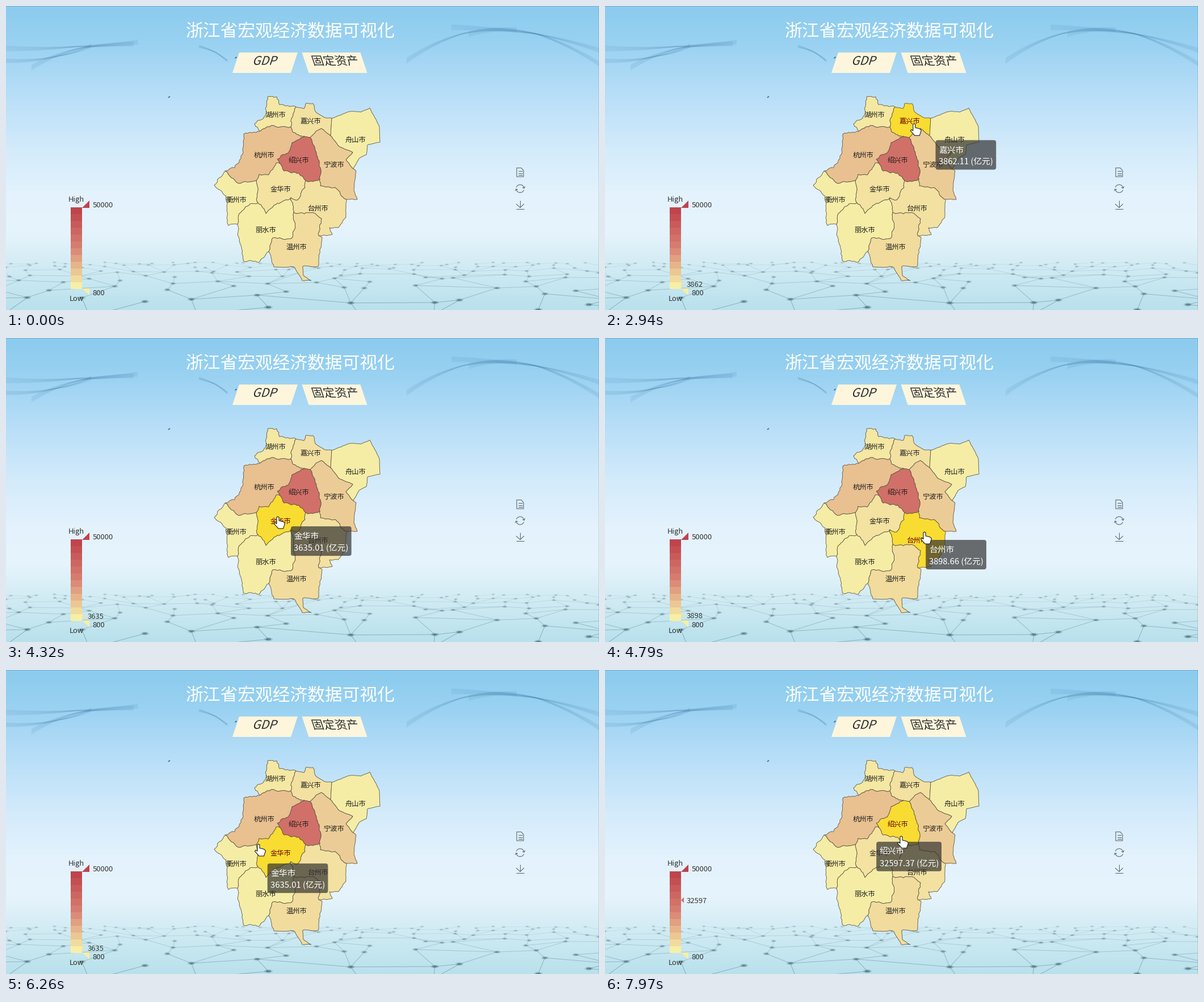
A matplotlib script that plays this animation: 1045 px wide and 536 px high, repeating every 8 s.

```python
import numpy as np
import matplotlib.pyplot as plt
from matplotlib.animation import FuncAnimation
from matplotlib.collections import EllipseCollection, LineCollection
from matplotlib.colors import to_rgb
from matplotlib.patches import FancyBboxPatch, PathPatch, Polygon, Rectangle
from matplotlib.path import Path
from matplotlib.textpath import TextPath

W, H, DPI = 1045, 536, 64
STEP, LOOP = 50, 8000

plt.rcParams["font.family"] = "Noto Sans CJK JP"
rng = np.random.default_rng(5)
fig = plt.figure(figsize=(W / DPI, H / DPI), dpi=DPI)
ax = fig.add_axes([0, 0, 1, 1])
ax.axis("off")


def px(size):
    return size * 72 / DPI


def label(x, y, s, size, color="#333333", ha="center", z=5):
    """Text whose glyphs are centred on height y."""
    return ax.text(x, y + 0.37 * size, s, fontsize=px(size), color=color,
                   ha=ha, va="baseline", zorder=z)


def poly(points, color, edge="none", lw=0, z=3):
    return ax.add_patch(Polygon(points, closed=True, fc=color, ec=edge,
                                lw=px(lw), joinstyle="round", zorder=z))


def stroke(xs, ys, color="#5f6a70", lw=1.1, z=4):
    ax.plot(xs, ys, color=color, lw=px(lw), zorder=z, solid_capstyle="butt")


# ---------- backdrop ----------
SKY = {0: "#8bcbee", 60: "#98d1f1", 160: "#b9dff8", 250: "#d3ebfb",
       330: "#e3f2fd", 400: "#e6f4fc", 445: "#d6edf5", 536: "#b8e1ec"}


def draw_sky():
    tones = np.array([to_rgb(c) for c in SKY.values()])
    rows = np.stack([np.interp(np.arange(H), list(SKY), tones[:, k])
                     for k in range(3)], axis=1)
    image = np.repeat(rows[:, None], W, axis=1)
    image[0] *= 0.86
    image[:, -1] *= 0.88
    ax.imshow((image * 255).astype(np.uint8), extent=(0, W, H, 0),
              interpolation="nearest", aspect="auto", zorder=0)


def wave(start, bend, end, count=9, spread=13):
    """Faint strands along a quadratic curve, fanning out from its middle."""
    u = np.linspace(0, 1, 40)[:, None]
    p, q, r = map(np.array, (start, bend, end))
    base = (1 - u) ** 2 * p + 2 * u * (1 - u) * q + u ** 2 * r
    fan = np.column_stack([0 * u, 1.3 * np.abs(u - 0.55) + 0.08])
    strands = [base + fan * spread * k / count for k in range(count)]
    ax.add_collection(LineCollection(strands, colors="#33709f", alpha=0.065,
                                     linewidths=px(1.4), zorder=1))


def draw_waves():
    wave((0, 70), (110, 78), (232, 60))
    wave((0, 93), (90, 99), (150, 67), spread=10)
    wave((45, 104), (110, 68), (225, 63))
    wave((340, 69), (368, 78), (390, 95), spread=6)
    wave((706, 92), (790, 36), (900, 38))
    wave((785, 33), (930, 40), (1045, 74))
    wave((815, 45), (915, 20), (1045, 98))
    for x, y in ((405, 91), (287.5, 160.5)):
        stroke([x - 1.5, x + 1.5], [y + 1, y - 1], "#3c6c95", 1.8, 1)


def draw_network():
    """Jittered grid of nodes on a receding floor, joined to their neighbours."""
    rows = []
    for k in range(8):
        depth = 19 * 1.27 ** k
        gap = 1.5 * depth
        x = np.arange(-gap, W + 2 * gap, gap)
        x = x + rng.uniform(-0.38, 0.38, len(x)) * gap
        y = 435 + depth * (1 + rng.uniform(-0.12, 0.12, len(x)))
        rows.append(np.column_stack([x, y]))
    links = []
    for row, ahead in zip(rows, rows[1:] + [None]):
        links += [pair for pair in zip(row, row[1:]) if rng.random() < 0.6]
        if ahead is not None:
            for p in row:
                near = np.argmin(np.abs(ahead[:, 0] - p[0] + rng.normal(0, 15)))
                links.append((p, ahead[near]))
    dots = np.vstack(rows)

    def tint(color, alpha):
        return [(*to_rgb(color), a) for a in alpha]

    reach = np.clip((np.array(links)[:, :, 1].mean(axis=1) - 450) / 75, 0, 1)
    ax.add_collection(LineCollection(
        links, colors=tint("#4a7684", 0.08 + 0.42 * reach),
        linewidths=px(0.9), zorder=1))
    size = np.clip((dots[:, 1] - 450) / 80, 0, 1)
    for grow, alpha in ((1.6, 0.13), (1, 0.36)):
        ax.add_collection(EllipseCollection(
            grow * (4.5 + 5 * size), grow * (2 + 2 * size), 0 * size, units="xy",
            offsets=dots, offset_transform=ax.transData, edgecolors="none",
            facecolors=tint("#375b67", alpha * (0.5 + size)), zorder=1))


# ---------- heading, buttons, tools ----------
def slanted(s, cx, cy, size, slope):
    outline = TextPath((0, 0), s, size=size)
    x, y = outline.vertices.T
    box = outline.get_extents()
    y = y - (box.y0 + box.y1) / 2
    x = x - (box.x0 + box.x1) / 2 + slope * y
    ax.add_patch(PathPatch(Path(np.column_stack([cx + x, cy - y]), outline.codes),
                           fc="#2b2b2b", ec="none", zorder=4))


def button(cx, s, size, slope):
    lean = 18 * slope / 0.33
    poly([(cx - 51.5 + lean / 3, 82), (cx + 51.5 + lean / 3, 82),
          (cx + 51.5 - lean / 3, 118), (cx - 51.5 - lean / 3, 118)], "#fef6dc")
    slanted(s, cx + 1, 96, size, slope)


def draw_header():
    label(501, 43, "浙江省宏观经济数据可视化", 30.7, "white")
    button(456.5, "GDP", 21, 0.33)
    button(579, "固定资产", 20.5, -0.33)


def draw_tools():
    stroke([900, 908, 912, 912, 900, 900], [285.5, 285.5, 290, 301, 301, 285])
    for y in (291, 294.5, 298):
        stroke([902.5, 909.5], [y, y])
    for s in (1, -1):
        a = np.linspace(0.15, np.pi - 0.35, 20)
        stroke(906 + s * 7 * np.cos(a), 322 - s * 7 * np.sin(a))
        stroke(906 + s * np.array([4, 7.2, 8.5]), 322 - s * np.array([2, 0.6, 4]))
    stroke([906, 906], [343, 355])
    stroke([899, 906, 913], [349, 355.5, 349])
    stroke([899, 913], [358, 358])


# ---------- colour scale ----------
LOW, HIGH = 800, 50000
RAMP = np.array([to_rgb(c) for c in ("#f6efa6", "#d88273", "#bf444c")])


def shade(value):
    t = (value - LOW) / (HIGH - LOW)
    return tuple(np.interp(t, (0, 0.5, 1), RAMP[:, k]) for k in range(3))


def scale_y(value):
    return 498.5 - 143.5 * (value - LOW) / (HIGH - LOW)


def draw_scale():
    for k in range(12):
        tone = shade(HIGH - (HIGH - LOW) * k / 11)
        ax.add_patch(Rectangle((113.5, 355 + 12 * k), 20.5, 12, fc=tone,
                               ec="none", antialiased=False, zorder=3))
    poly([(134, 356), (147, 343), (147, 356)], RAMP[2])
    poly([(134, 498), (147, 498), (147, 510)], RAMP[0])
    label(124, 340, "High", 13)
    label(124, 515.5, "Low", 13)
    label(152.5, 350, "50000", 13, ha="left")
    label(152.5, 505, "800", 13, ha="left")


# ---------- map: shared borders between lettered junctions ----------
JOINTS = dict(
    A=(511, 178), B=(502, 213), C=(447, 221), D=(526, 230), E=(536, 232),
    F=(572, 229), G=(574, 198), H=(612, 287), I=(600, 341), J=(553, 305),
    K=(528, 308), L=(483, 278), M=(441, 308), N=(386, 291), O=(444, 347),
    P=(408, 385), Q=(502, 338), R=(507, 364), S=(463, 433), T=(551, 405))
borders = {}


def border(ends, *via, rough=1.6):
    """Join two junctions, splitting each stretch at randomly shifted midpoints."""
    line = np.array([JOINTS[ends[0]], *via, JOINTS[ends[1]]], float)
    for _ in range(4):
        out = [line[0]]
        for a, b in zip(line, line[1:]):
            size = np.hypot(*(b - a))
            if size > 5:
                side = np.array([a[1] - b[1], b[0] - a[0]]) / size
                shift = rng.uniform(-1, 1) * min(0.2 * size, rough)
                out.append((a + b) / 2 + side * shift)
            out.append(b)
        line = np.array(out)
    borders[ends] = line
    borders[ends[::-1]] = line[::-1]


border("CA", (438, 208), (457, 193), (461, 160), (477, 160), (482, 174))
border("AB", (502, 203))
border("CB", (467, 211))
border("AG", (525, 181), (528, 172), (541, 172), (545, 186), (560, 196), rough=1)
border("BD", (505, 222))
border("DE", rough=0)
border("EF", (546, 221), (556, 216), rough=0.5)
border("FG", rough=0)
border("GH", (606, 186), (625, 187), (641, 180), (658, 213), (659, 240),
       (637, 245), (635, 262), (622, 269), rough=0.5)
border("FH", (586, 247), (611, 258), (599, 271), rough=0.7)
border("HI", (617, 291), (613, 325), (619, 341), rough=0.6)
border("EJ", (547, 262), (555, 294))
border("JK", (537, 309))
border("JI", (554, 317), (580, 320))
border("DL", (504, 241), (499, 256), (478, 270))
border("LK", (490, 291), (516, 295))
border("LM", (476, 277), (462, 298), (446, 297))
border("MN", (410, 313))
border("NC", (403, 285), (418, 258), (419, 226))
border("NP", (367, 316), (388, 335), (392, 387))
border("MO")
border("OP", (430, 349), (411, 366))
border("OQ", (458, 366), (478, 348))
border("QK", (514, 342), (527, 320))
border("QR")
border("RS", (508, 395), (503, 410), (470, 409))
border("PS", (410, 407), (418, 449), (446, 452))
border("RT", (545, 366), (556, 375))
border("IT", (599, 372), (585, 391), (570, 391), (575, 403), rough=1)
border("ST", (472, 460), (507, 460), (522, 484), (538, 484), (524, 475),
       (523, 459), (550, 459), (557, 408), rough=1)

# name: junction ring, label position, value
CITIES = {
    "湖州市": ("CABC", (475, 191), 2284.37),
    "嘉兴市": ("AGFEDBA", (537, 202), 3862.11),
    "舟山市": ("GHFG", (616, 235), 1241.20),
    "宁波市": ("FHIJEF", (577, 279), 8686.49),
    "绍兴市": ("DEJKLD", (516, 271), 32597.37),
    "杭州市": ("NCBDLMN", (455.5, 262), 11313.72),
    "金华市": ("MLKQOM", (483.5, 322), 3635.01),
    "衢州市": ("NMOPN", (406, 341), 1251.57),
    "台州市": ("KJITRQK", (550, 356), 3898.66),
    "丽水市": ("OQRSPO", (457.5, 394), 1210.24),
    "温州市": ("RTSR", (512, 424), 5101.56),
}

draw_sky()
draw_waves()
draw_network()
draw_header()
draw_tools()
draw_scale()

areas, names, shapes = {}, {}, {}
for city, (ring, spot, value) in CITIES.items():
    edge = np.vstack([borders[a + b] for a, b in zip(ring, ring[1:])])
    shapes[city] = Path(edge)
    areas[city] = poly(edge, shade(value), "#57503f", 0.8)
    names[city] = label(*spot, city, 12.3, "#1c1c1c")

# ---------- pointer, tooltip and scale marker ----------
# time: pointer position
STOPS = {
    600: (938, 449), 900: (817, 345), 1200: (817, 345), 1400: (604, 288),
    1750: (599, 287), 2200: (599, 287), 2450: (608, 240), 2920: (542, 206),
    3080: (546, 207), 3850: (515, 262), 4000: (479, 315), 4350: (479, 315),
    4700: (563, 342), 4800: (563, 342), 5050: (512, 328), 5200: (504, 384),
    5350: (478, 379), 5650: (470, 376), 5950: (427, 342), 6250: (445, 307),
    6600: (452, 282), 7949: (452, 282), 7950: (522, 293)}
TIMES, SPOTS = list(STOPS), np.array(list(STOPS.values()))

# the tooltip trails the pointer as an exponentially fading average
LAG = np.arange(0, 700, 10)
TRAIL = np.exp(-LAG / 130)
TRAIL /= TRAIL.sum()

ARROW = np.array([(0, 0), (0, 16), (4, 12.5), (6.5, 18.5), (9, 17.5),
                  (6.5, 11.5), (12, 11.5)])
HAND = np.array([(-2, 1), (0, 0), (2, 1), (2, 7), (10, 9), (12.5, 12), (9.5, 21),
                 (1, 21), (-6.5, 12.5), (-5, 10.5), (-2, 12.5)])

box = ax.add_patch(FancyBboxPatch((0, 0), 1, 1,
                                  boxstyle="round,pad=0,rounding_size=4",
                                  fc=(0.196, 0.196, 0.196, 0.7), ec="none", zorder=7))
tip_name = label(0, 0, "", 14.7, "white", "left", 8)
tip_value = label(0, 0, "", 14.7, "white", "left", 8)
mark = poly(ARROW, "white", z=6)
mark_text = label(144, 0, "", 13, ha="left", z=6)
pointer = poly(ARROW, "white", "#1a1a1a", 1.1, z=9)
hover_parts = (box, tip_name, tip_value, mark, mark_text)


def pointer_at(t):
    return np.stack([np.interp(t, TIMES, SPOTS[:, k]) for k in (0, 1)], axis=-1)


def show_value(value, city, x, y):
    figure = f"{value:.2f}"
    box.set_bounds(x, y, 50 + 8.1 * len(figure), 52)
    tip_name.set_text(city)
    tip_name.set_position((x + 5.5, y + 22))
    tip_value.set_text(figure + " (亿元)")
    tip_value.set_position((x + 5.5, y + 43))
    level = scale_y(value)
    mark.set_xy([(134, level), (139, level - 5), (139, level + 5)])
    mark.set_facecolor(shade(value))
    mark_text.set_text(str(int(value)))
    mark_text.set_y(level + 5)


def update(i):
    t = i * STEP
    spot = pointer_at(t)
    city = next((c for c, s in shapes.items() if s.contains_point(spot)), None)

    for name, area in areas.items():
        on = name == city
        area.set_facecolor("#f9dc31" if on else shade(CITIES[name][2]))
        names[name].set_color("#640000" if on else "#1c1c1c")

    pointer.set_visible(t >= TIMES[0])
    pointer.set_xy(spot + (HAND if city else ARROW))
    for part in hover_parts:
        part.set_visible(city is not None)
    if city:
        show_value(CITIES[city][2], city, *(TRAIL @ pointer_at(t - LAG) + (21, 20)))
    return (*hover_parts, pointer, *areas.values(), *names.values())


ax.set_xlim(0, W)
ax.set_ylim(H, 0)
anim = FuncAnimation(fig, update, frames=LOOP // STEP, interval=STEP,
                     repeat=True, repeat_delay=0, blit=False)
plt.show()
```
